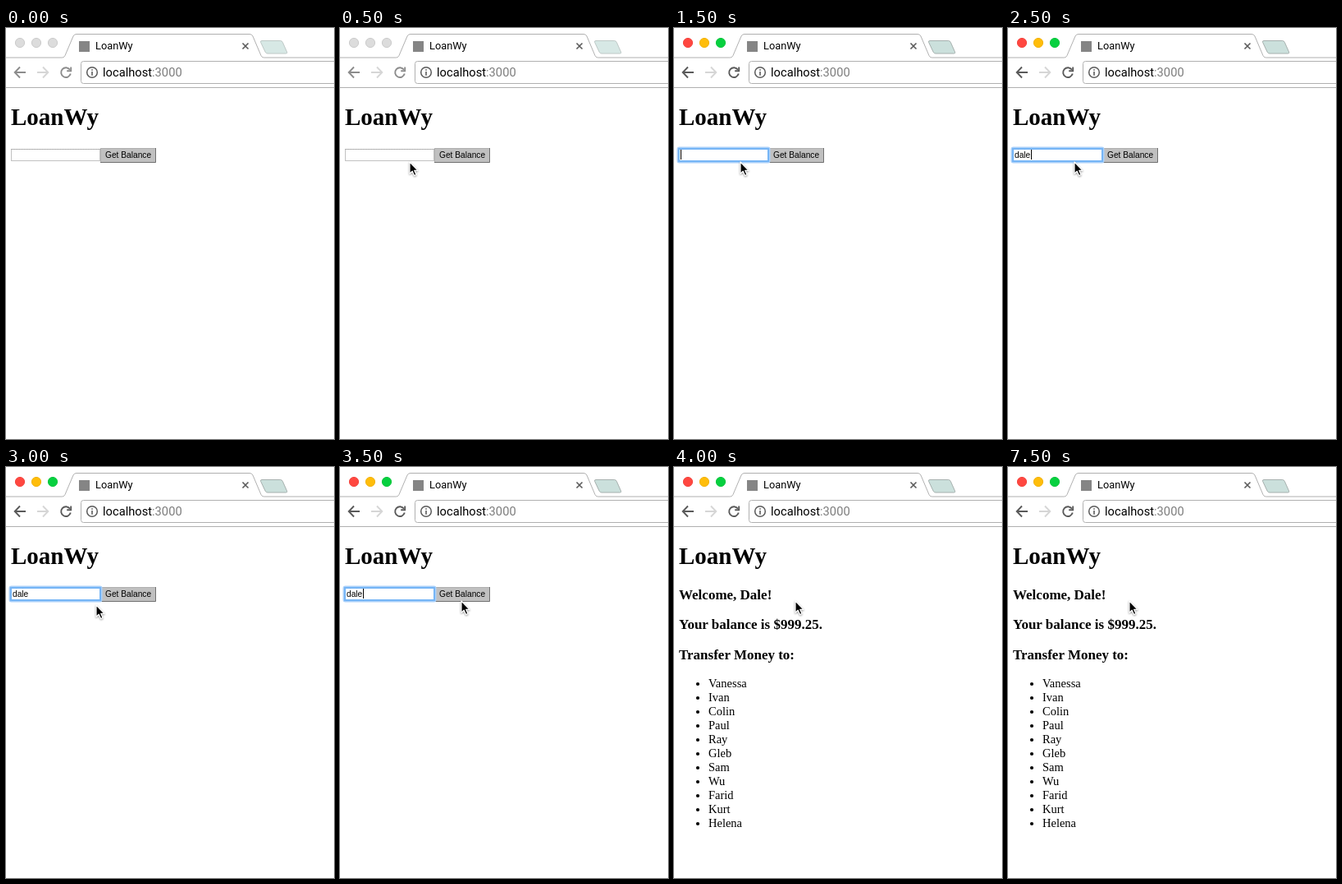
These frames come from a looping animation (400x500 px, 8000 ms). An HTML page:

```html
<!DOCTYPE html>
<html lang="en">
<head>
<meta charset="utf-8">
<title>LoanWy</title>
<style>
  html, body { margin: 0; width: 100%; height: 100%; overflow: hidden; background: #fff; }
  svg { display: block; width: 400px; height: 500px; }
  .ui { font-family: Roboto, "Liberation Sans", sans-serif; }
  .form { font: 10.2px "Liberation Sans", Arial, sans-serif; }
  .page { font: 14.5px "Liberation Serif", "Times New Roman", serif; }
  .h1 { font-size: 29px; font-weight: bold; }
  .h3 { font-size: 17px; font-weight: bold; }
  .line { fill: none; stroke: #b0b0b0; }
  .icon { fill: none; stroke: #5a5a5a; stroke-width: 1.9; }
  .red { fill: #ff4740; stroke: #f4443e; }
  .amber { fill: #ffbd0a; stroke: #f2b20a; }
  .green { fill: #06d03f; stroke: #09c63c; }
  .plus { fill: #cbe0dc; stroke: #a6b0ae; }
  .idle .light { fill: #dcdcdc; stroke: #cbcbcb; }
  .idle .icon { stroke: #8c8c8c; }
  .idle .plus { fill: #d7e8e5; stroke: #bec8c6; }
  .icon.off, .idle .icon.off { stroke: #d6d6d6; }
  #cursor { filter: drop-shadow(0 1px 1px rgba(0, 0, 0, .4)); }
</style>
</head>
<body>
<svg viewBox="0 0 400 500">
  <g id="chrome" class="ui">
    <circle class="light red" cx="17" cy="18" r="5.6"/>
    <circle class="light amber" cx="37" cy="18" r="5.6"/>
    <circle class="light green" cx="57" cy="18" r="5.6"/>
    <path class="line" d="M0 36H68.5Q71 36 72 33.5L82 10Q83 7.5 86 7.5H297Q300 7.5 301 10L311 33.5Q312 36 314.5 36H400"/>
    <path class="plus" d="M312 15.5H334.5Q336.5 15.5 337.3 17.3L342.6 29.2Q343.4 31 341.5 31H319Q317 31 316.2 29.2L310.6 17.3Q310 15.5 312 15.5Z"/>
    <rect x="89" y="16" width="13" height="13" fill="#858585"/>
    <text x="109" y="26" font-size="12.8">LoanWy</text>
    <path d="M288.5 18.5L295.5 25.5M295.5 18.5L288.5 25.5" stroke="#5a5a5a" stroke-width="1.6"/>
    <path class="icon" d="M24 54H11M17 47.5L10.7 54L17 60.5"/>
    <path class="icon off" d="M38 54H51M45 47.5L51.3 54L45 60.5"/>
    <path class="icon" d="M78 50.8A5.9 5.9 0 1 0 78.8 55.6"/>
    <path class="icon" d="M79.2 47.4V52.3H74.2"/>
    <rect class="line" x="91.5" y="40.5" width="320" height="27" rx="3"/>
    <circle cx="105" cy="54" r="6.3" fill="none" stroke="#5a5a5a" stroke-width="1.5"/>
    <path d="M105 53V57.8M105 50.2V51.8" stroke="#5a5a5a" stroke-width="1.6"/>
    <text x="118" y="59" font-size="14.7">localhost<tspan fill="#7d7d7d">:3000</tspan></text>
    <path class="line" d="M0 72.5H400"/>
  </g>

  <text class="page h1" x="6" y="118">LoanWy</text>

  <g id="form" class="form">
    <rect x="115" y="146" width="68" height="18" fill="#c0c0c0"/>
    <path d="M115 163.5H182.5V146" fill="none" stroke="#707070"/>
    <path d="M115.5 163V146.5H182" fill="none" stroke="#b0b0b0"/>
    <text x="121" y="158">Get Balance</text>
    <rect x="6.5" y="147.5" width="108" height="14" fill="#fff" stroke="#c2c2c2"/>
    <path d="M6 147.5H115" stroke="#a6a6a6" stroke-dasharray="1 1"/>
    <g id="ring" fill="none">
      <rect x="4.5" y="145.5" width="112" height="18" rx="2" stroke="#a9d0fa" stroke-width="2"/>
      <rect x="6" y="147" width="109" height="15" stroke="#76b5f6" stroke-width="2"/>
    </g>
    <text id="field" x="8" y="158"></text>
    <rect id="caret" y="148" width="1" height="12"/>
  </g>

  <g class="page">
    <g id="account">
      <text class="h3" x="6" y="161">Welcome, Dale!</text>
      <text class="h3" x="6" y="197">Your balance is $999.25.</text>
    </g>
    <g id="people">
      <text class="h3" x="6" y="234">Transfer Money to:</text>
    </g>
  </g>

  <g id="cursor">
    <path d="M0 0V14.2L3.2 11.2L5.6 16.6L8 15.5L5.7 10.3H10Z" fill="#000" stroke="#fff" stroke-width="1.2" stroke-linejoin="round"/>
  </g>
</svg>
<script>
const LOOP = 8000;
const NAMES = "Vanessa Ivan Colin Paul Ray Gleb Sam Wu Farid Kurt Helena".split(" ");
const $ = id => document.getElementById(id);

// Each step overrides only what changes; the pointer is [x, y].
const STEPS = [
  { at: 0, idle: true, pointer: null, focus: false, caret: null, typed: "", account: false, people: false },
  { at: 250, pointer: [136, 144] },
  { at: 500, pointer: [85, 163] },
  { at: 750, pointer: [81, 163] },
  { at: 1000, idle: false },
  { at: 1500, focus: true, caret: 8 },
  { at: 2000, caret: null },
  { at: 2250, typed: "d", caret: 14 },
  { at: 2500, typed: "dale", caret: 28 },
  { at: 3000, caret: null, pointer: [110, 168] },
  { at: 3250, pointer: [177, 165] },
  { at: 3500, caret: 28, pointer: [148, 163] },
  { at: 3750, account: true },
  { at: 4000, people: true }
];

const addNode = (tag, attrs, text = "") => {
  const node = document.createElementNS("http://www.w3.org/2000/svg", tag);
  for (const key in attrs) node.setAttribute(key, attrs[key]);
  node.textContent = text;
  $("people").append(node);
};

NAMES.forEach((name, i) => {
  const y = 268 + i * 17;
  addNode("circle", { cx: 29, cy: y - 4, r: 2.1 });
  addNode("text", { x: 42, y }, name);
});

const show = (id, on) => $(id).setAttribute("visibility", on ? "inherit" : "hidden");

function draw(time) {
  const state = Object.assign({}, ...STEPS.filter(step => step.at <= time));
  $("chrome").classList.toggle("idle", state.idle);
  show("form", !state.account);
  show("ring", state.focus);
  show("caret", state.caret !== null);
  show("account", state.account);
  show("people", state.people);
  show("cursor", state.pointer);
  $("field").textContent = state.typed;
  if (state.caret !== null) $("caret").setAttribute("x", state.caret);
  if (state.pointer) $("cursor").setAttribute("transform", `translate(${state.pointer})`);
}

const start = performance.now();
function tick() {
  draw((performance.now() - start) % LOOP);
  requestAnimationFrame(tick);
}
tick();
</script>
</body>
</html>
```
